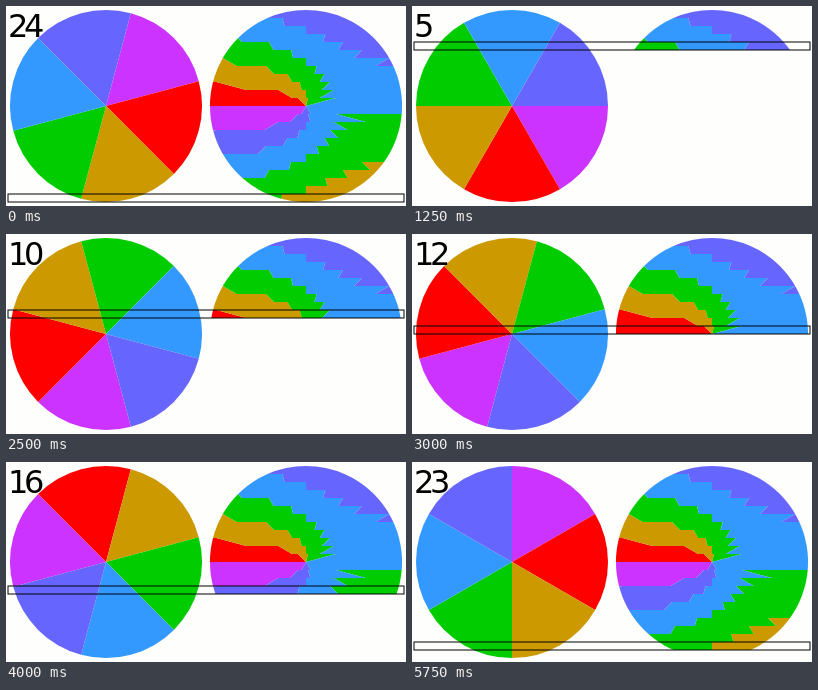
Recreate the animation shown at these times as an HTML page with a canvas. Size 400 px wide and 200 px high, loop 6 s.

```html
<!DOCTYPE html>
<html lang="en">
<head>
<meta charset="utf-8">
<title>Rolling shutter</title>
<style>
  html, body { margin: 0; width: 100%; height: 100%; overflow: hidden; background: #fefefc; }
  canvas { display: block; }
</style>
</head>
<body>
<canvas id="stage" width="400" height="200"></canvas>
<script>
const ctx = document.getElementById('stage').getContext('2d');
const STEPS = 24, STEP_MS = 250;
const RADIUS = 96, TOP = 4, ROW = 8;
// Clockwise order of the sectors.
const COLORS = ['#c3f', '#f00', '#c90', '#0c0', '#39f', '#66f'];
const SECTOR = 2 * Math.PI / COLORS.length;

function drawDisc(cx, step) {
  const turn = (step + 1) * 2 * Math.PI / STEPS - Math.PI / 2;
  COLORS.forEach((color, i) => {
    const start = turn + i * SECTOR;
    ctx.fillStyle = color;
    ctx.beginPath();
    ctx.moveTo(cx, 100);
    ctx.arc(cx, 100, RADIUS, start, start + SECTOR);
    ctx.fill();
  });
}

const rowTop = step => TOP + (step - 1) * ROW;

// Each scanned row keeps the pose the disc had when the shutter passed it.
function drawScannedRow(step) {
  ctx.save();
  ctx.beginPath();
  ctx.rect(200, rowTop(step), 200, ROW);
  ctx.clip();
  drawDisc(300, step);
  ctx.restore();
}

function draw(step) {
  ctx.fillStyle = '#fefefc';
  ctx.fillRect(0, 0, 400, 200);
  drawDisc(100, step);
  for (let row = 1; row <= step; row++) drawScannedRow(row);

  ctx.strokeStyle = '#000';
  ctx.lineWidth = 1;
  ctx.strokeRect(2, rowTop(step), 396, ROW);

  ctx.fillStyle = '#000';
  ctx.font = '32px "DejaVu Sans", sans-serif';
  ctx.letterSpacing = '-4.4px';
  ctx.fillText(step, 2, 31);
}

function tick() {
  draw(Math.floor(performance.now() / STEP_MS) % STEPS || STEPS);
  requestAnimationFrame(tick);
}
tick();
</script>
</body>
</html>
```
